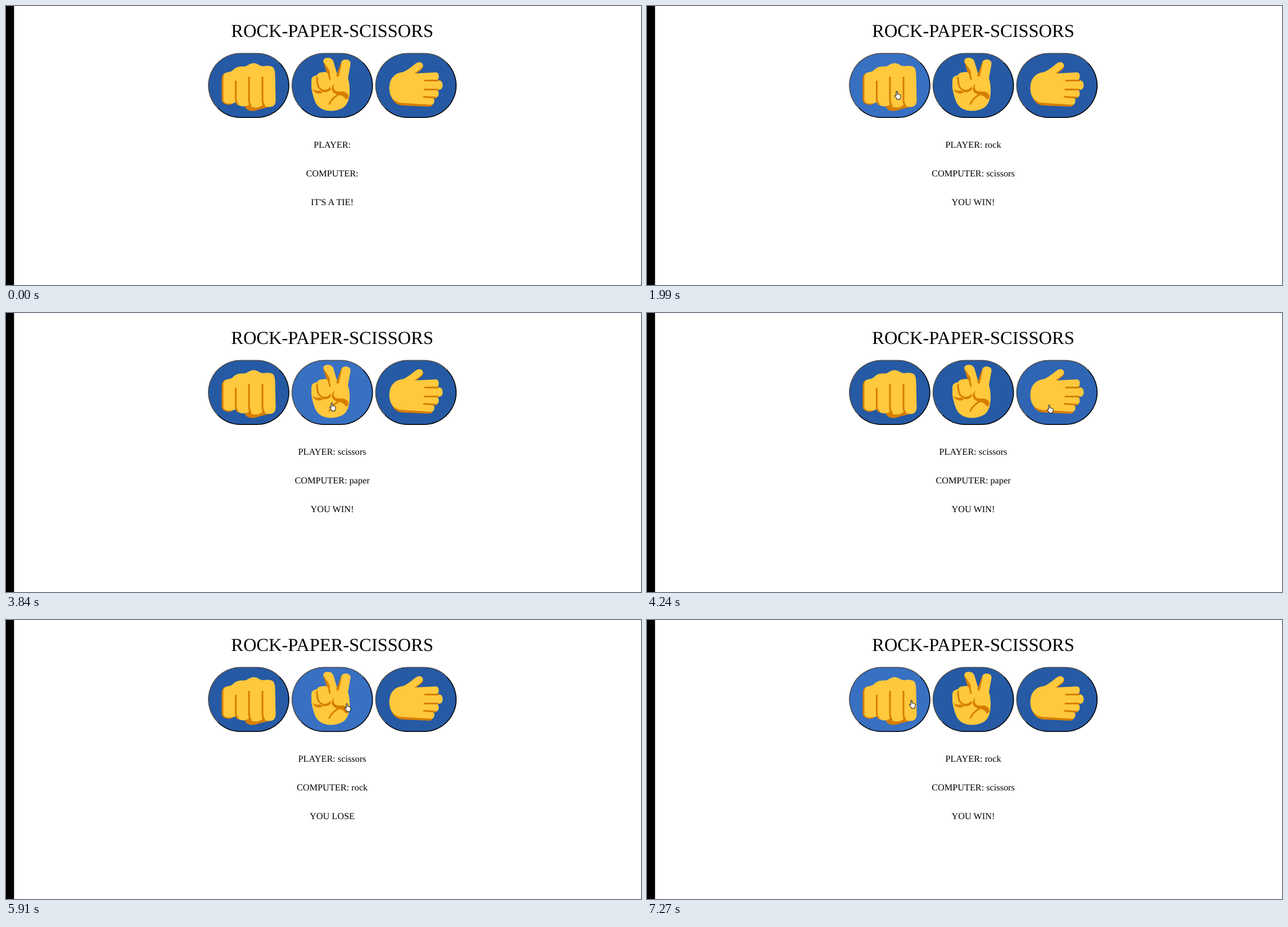
Recreate the animation shown at these times as an HTML page. Size 1129 px wide and 496 px high, loop 8 s.

```html
<!DOCTYPE html>
<html lang="en">
<head>
<meta charset="utf-8">
<title>Rock-Paper-Scissors</title>
<style>
  html, body { margin: 0; width: 100%; height: 100%; overflow: hidden; background: #fff; }
  svg { display: block; width: 1129px; height: 496px; }
  text { font-family: "Liberation Serif", "Times New Roman", serif; font-size: 16.25px; text-anchor: middle; text-rendering: geometricPrecision; }
  .title { font-size: 32.45px; }
  .skin { fill: #ffc83d; }
  .shade { fill: #d67d00; }
  .crease { fill: none; stroke: #d67d00; stroke-width: 3; stroke-linecap: round; stroke-linejoin: round; }
  .edge { fill: none; stroke-width: 1.6; }
  .pointer { fill: #fff; stroke: #000; stroke-width: 1; stroke-linejoin: round; }
</style>
</head>
<body>
<svg viewBox="0 0 1129 496">
  <rect width="14.3" height="496"/>
  <text class="title" x="580" y="55">ROCK-PAPER-SCISSORS</text>

  <g id="buttons"></g>

  <g id="rock">
    <path class="shade" d="M389 119Q383.500 122 383.500 131V167Q384 173 392 175Q398 177 404 173L390 165Z"/>
    <path class="shade" d="M423 174Q425 185 435 186.500Q441 187.500 450 184L473 178L450 171Z"/>
    <path class="skin" d="M386.500 128Q386 119 393 118Q401 117 404 113.500Q409 108 418 107.500Q427 108 430 105Q434 102 440 101.500Q447 102 450 105Q453 107 458 107Q469 105 475 109Q478.500 113 478.500 124L479.500 168Q479 179.500 468 179.500Q461 179.500 457 175Q452 180.500 444 180.500Q435 180.500 432 175Q428 178.500 421 178.500Q412 178 409 171Q404 173.500 397 173.500Q388 173.500 386.500 168Z"/>
    <path class="crease" d="M408.500 134V165Q408.500 171 412 175M432 127V167Q432 173 435 177M456 127V168Q456 173 459 177"/>
  </g>

  <g id="scissors">
    <path class="skin" d="M564 99Q563.500 93 571 92Q579 91.500 582 98L589 122L596 100Q598 95 605 95Q613 96 612.500 103L608 128Q611 138 611 150Q611 172 600 180.500Q590 186.500 577 186.500Q559 186 551 173Q546 163 543 146V131Q544 124 553 123Q555 118 562 118Q567 116.500 572 118Z"/>
    <path class="shade" d="M564 98L570 118L575 123Q577 118 574 113Z"/>
    <path class="shade" d="M597 98L587 124L591 126Q595 114 597 98Z"/>
    <path class="shade" d="M545 148Q552 152 558 150Q562 154 565 152Q560 157 553 155Q547 153 545 148Z"/>
    <path class="shade" d="M556 142Q561 150 568 149Q575 148 576 143L578 148Q573 154 565 153Q557 150 553 141Z"/>
    <path class="shade" d="M584 138Q580 146 586 151Q592 153 600 152Q609 155 609 162Q608 166 604 166Q600 159 592 158Q580 156 579 147Q580 141 584 138Z"/>
    <path class="crease" d="M553 127Q552.500 136 556 145M574 122L576 130M575 174Q580 163 592 157"/>
  </g>

  <g id="paper">
    <path class="shade" d="M681.500 145Q682 162 692 172Q698 177 708 177L753 179Q759 178 760 171L710 160Z"/>
    <path class="shade" d="M741.500 105Q743 109 737 114L727 122L722 119Z"/>
    <path class="skin" d="M681.500 146Q681.500 131 690.500 123.500Q696 118.500 706 117.500Q715 113.500 728 102.500Q735 97.500 740 102Q743.500 107 737 112L726 120L764 118Q769.500 118 769.500 125Q769.500 131 765 132H770Q776.500 133 776.500 141Q776.500 148 770 149H765Q769.500 150 769.500 156Q769 163 763 163H758Q762.500 165 761.500 170Q761 175.500 755 175.500L707 172.500Q696 172.500 689 166.500Q681.500 159 681.500 146Z"/>
    <path class="crease" d="M745 132.500H768M744 148.500H768M743 161.500L764 163"/>
  </g>

  <text id="player" x="580" y="252.4"></text>
  <text id="computer" x="580" y="303.4"></text>
  <text id="result" x="580" y="354"></text>

  <g id="cursor">
    <path id="arrow" class="pointer" d="M-2 -7V5L1 2.500L3 7L5 6L3 1.700H7Z"/>
    <path id="hand" class="pointer" transform="translate(1 .5)" d="M-3 -5.500Q-3 -7 -2 -7Q-.8 -7 -.8 -5.500V-1.500Q.3 -2.200 1.200 -1.300Q2.400 -1.800 3.200 -.8Q5 -1 5 .8V3Q5 4 4 5.500V7.500H-2V6L-5.500 1.800Q-6 .2 -4.300 .6L-3 1.600Z"/>
  </g>
</svg>
<script>
const LOOP = 8000, STEP = 66, FADE = 400, PRESS = 70;
const BASE = [38, 90, 164], HOVER = [56, 112, 194];
const byId = id => document.getElementById(id);

// Button order: 0 rock, 1 scissors, 2 paper
const moves = [
  { start: 660,  steps: 8, from: [1029, 492], to: [445, 158], enter: 1056, button: 0 },
  { start: 2380, steps: 7, from: [445, 158],  to: [575, 166], enter: 2578, button: 1 },
  { start: 3840, steps: 6, from: [575, 166],  to: [716, 170], enter: 4038, button: 2 },
  { start: 5170, steps: 8, from: [716, 170],  to: [607, 155], enter: 5434, button: 1 },
  { start: 6720, steps: 4, from: [607, 155],  to: [471, 149], enter: 6852, button: 0 }
];
const rounds = [
  { at: 0,    player: "",         computer: "",         result: "IT'S A TIE!" },
  { at: 1990, player: "rock",     computer: "scissors", result: "YOU WIN!" },
  { at: 3390, player: "scissors", computer: "paper",    result: "YOU WIN!" },
  { at: 4570, player: "paper",    computer: "rock",     result: "YOU WIN!" },
  { at: 5910, player: "scissors", computer: "rock",     result: "YOU LOSE" },
  { at: 7270, player: "rock",     computer: "scissors", result: "YOU WIN!" }
];

function makePath(className, d) {
  const path = document.createElementNS("http://www.w3.org/2000/svg", "path");
  path.setAttribute("class", className);
  path.setAttribute("d", d);
  byId("buttons").append(path);
  return path;
}

// A pill whose rim is split at the two diagonal corners
function makeButton(left) {
  const r = 57, cy = 141.25, k = r * Math.SQRT1_2;
  const l = left + 57.75, m = l + 29;
  const arc = (x, y) => `A${r} ${r} 0 0 1 ${x} ${y}`;
  const low = [l - k, cy + k], high = [m + k, cy - k];
  const upper = arc(l, cy - r) + `H${m}` + arc(...high);
  const lower = arc(m, cy + r) + `H${l}` + arc(...low);
  return {
    face: makePath("face", `M${low}${upper}${lower}Z`),
    upper: makePath("edge", `M${low}${upper}`),
    lower: makePath("edge", `M${high}${lower}`)
  };
}
const buttons = [359.2, 507.9, 656.6].map(makeButton);

const clamp = v => Math.max(0, Math.min(1, v));
const ease = p => p * p * p * (p * (p * 6 - 15) + 10);
const mix = (a, b, p) => a + (b - a) * p;
const latest = (list, key, t) => list.filter(item => item[key] <= t).pop();

function drawButtons(t, move, hovered) {
  const pressed = rounds.some(r => r.at && t >= r.at - PRESS && t < r.at);
  buttons.forEach((b, i) => {
    const active = i === hovered;
    const p = !active ? 0 : i === move.button ? ease(clamp((t - move.enter) / FADE)) : 1;
    const down = active && pressed;
    b.face.setAttribute("fill", `rgb(${BASE.map((c, j) => Math.round(mix(c, HOVER[j], p)))})`);
    b.upper.setAttribute("stroke", down ? "#000" : "#4c4c4c");
    b.lower.setAttribute("stroke", down ? "#4c4c4c" : "#000");
  });
}

function drawCursor(t, move, hovered) {
  byId("cursor").style.display = move ? "" : "none";
  if (!move) return;
  const p = ease(clamp((Math.floor((t - move.start) / STEP) + 1) / move.steps));
  const [x, y] = move.from.map((v, i) => mix(v, move.to[i], p));
  byId("cursor").setAttribute("transform", `translate(${x} ${y})`);
  byId("arrow").style.display = hovered < 0 ? "" : "none";
  byId("hand").style.display = hovered < 0 ? "none" : "";
}

function drawText(t) {
  const round = latest(rounds, "at", t);
  byId("player").textContent = `PLAYER: ${round.player}`.trim();
  byId("computer").textContent = `COMPUTER: ${round.computer}`.trim();
  byId("result").textContent = round.result;
}

function draw(t) {
  const move = latest(moves, "start", t);
  const entered = latest(moves, "enter", t);
  const hovered = entered ? entered.button : -1;
  drawButtons(t, move, hovered);
  drawCursor(t, move, hovered);
  drawText(t);
}

const begin = performance.now();
function tick() {
  draw((performance.now() - begin) % LOOP);
  requestAnimationFrame(tick);
}
tick();
</script>
</body>
</html>
```
